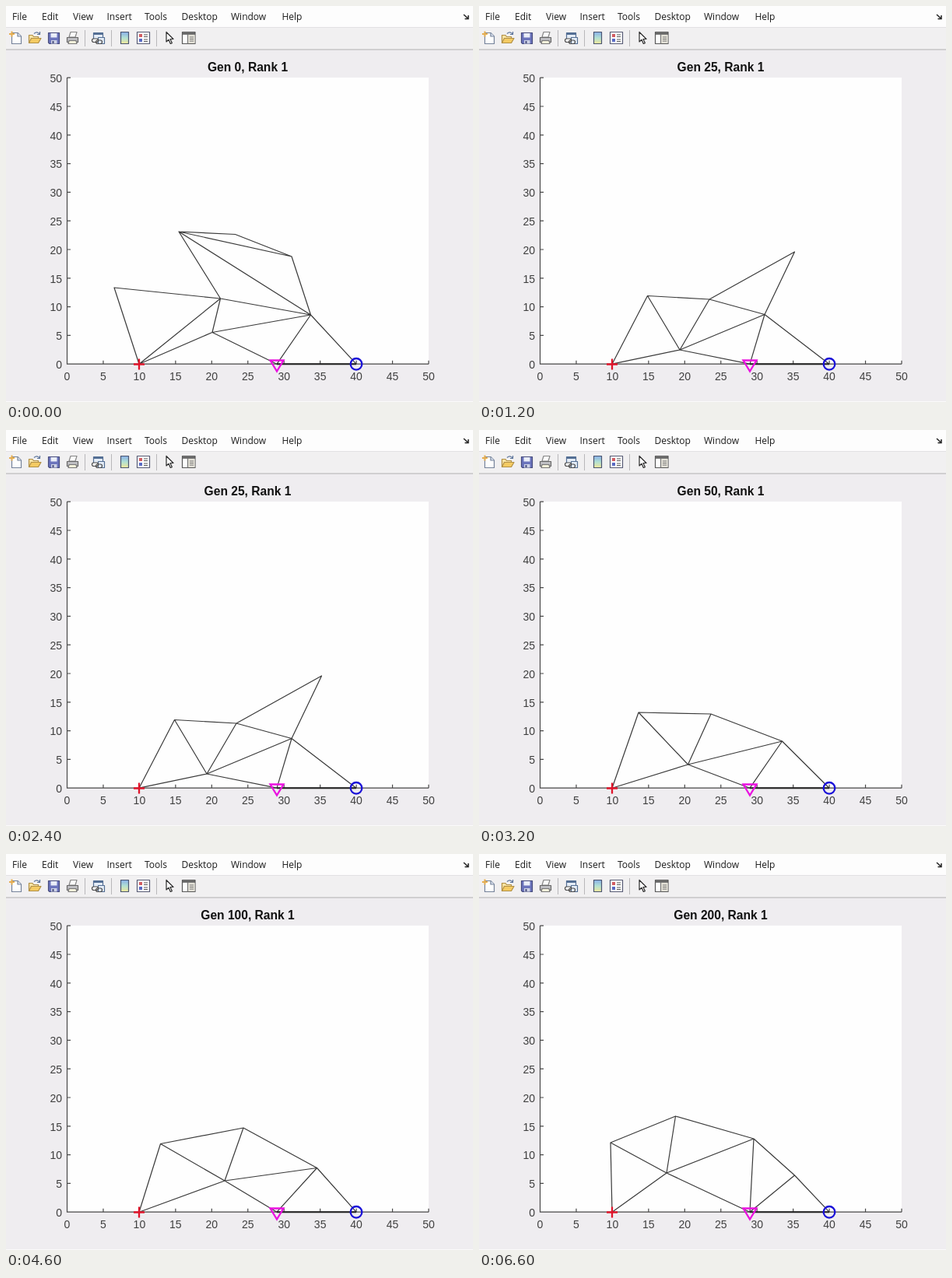
Write an HTML page that moves like this. It is 600 px wide and 509 px high and loops after 8 s.

```html
<!DOCTYPE html>
<html lang="en">
<head>
<meta charset="utf-8">
<title>Truss evolution</title>
<style>
html, body { margin: 0; width: 100%; height: 100%; overflow: hidden; background: #efedf0; }
svg { display: block; width: 600px; height: 509px; }
.menu { font: 12px "Open Sans", "Noto Sans", sans-serif; fill: #1c1c1c; }
.ticks { font: 14px "Liberation Sans", Arial, sans-serif; fill: #404040; }
.title { font: bold 15.6px "Liberation Sans", Arial, sans-serif; fill: #111; text-anchor: middle; }
.axis { stroke: #484848; stroke-width: 1.2; fill: none; }
.truss { stroke: #3a3a3a; stroke-width: 1.2; fill: none; stroke-linejoin: round; }
.mark { fill: none; stroke-width: 2.3; }
</style>
</head>
<body>
<svg viewBox="0 0 600 509">
  <rect width="600" height="509" fill="#efedf0"/>
  <rect width="600" height="27" fill="#fdfdfd"/>
  <rect y="27" width="600" height="29" fill="#f1f0f1"/>
  <path d="M0 27.5H600" stroke="#e2e1e3"/>
  <path d="M0 56H600" stroke="#b0afb1"/>
  <path d="M0 508.5H600" stroke="#fafafa"/>

  <g class="menu" id="menu"></g>
  <path d="M588 11L593 15.500M594 12V16.500H589.500" fill="none" stroke="#222" stroke-width="1.5"/>

  <!-- toolbar -->
  <g stroke-width="1.2" stroke-linejoin="round" opacity=".88">
    <path d="M7.500 34.500H15L19.500 39V48.500H7.500Z" fill="#fff" stroke="#64748f"/>
    <path d="M15 34.500V39H19.500" fill="#dce5f2" stroke="#64748f"/>
    <path d="M4 36H11M7.500 32.500V39.500" stroke="#e5a63a" stroke-width="2"/>
    <path d="M29.500 47.500V37.500H34L35.500 39.500H41.500V42" fill="#fbe39a" stroke="#a9832f"/>
    <path d="M29.500 47.500L32.500 41.500H45L41.500 47.500Z" fill="#f5c650" stroke="#a9832f"/>
    <path d="M36 35.500Q40 32 43 36M43.500 33V36.500H40" fill="none" stroke="#46628f"/>
    <path d="M54.500 34.500H68.500V48.500H56L54.500 47Z" fill="#5963b5" stroke="#30366e"/>
    <path d="M57.500 35H65.500V40.500H57.500Z" fill="#e9edfa"/>
    <path d="M58 44H65.500V48.500H58Z" fill="#c9cee4"/>
    <path d="M59.500 45H61.500V48H59.500Z" fill="#30366e"/>
    <path d="M81 40L83 33.500H91L89 40Z" fill="#fff" stroke="#777"/>
    <path d="M78.500 40.500H92.500V46.500H78.500Z" fill="#b9b9bd" stroke="#555"/>
    <path d="M81 44.500H90L91 48.500H80Z" fill="#f4f0d8" stroke="#666"/>
    <path d="M112.500 34.500H124.500V43.500H112.500Z" fill="#e4edf8" stroke="#3f5e88"/>
    <path d="M112.500 36H124.500" stroke="#3f5e88" stroke-width="2"/>
    <path d="M118.500 40.500H126.500V48.500H118.500Z" fill="#e4edf8" stroke="#3f5e88"/>
    <rect x="110.500" y="42" width="8" height="4.500" rx="2.200" fill="#fff" stroke="#333"/>
    <rect x="115.500" y="44" width="8" height="4.500" rx="2.200" fill="none" stroke="#333"/>
    <rect x="147.500" y="33.500" width="10" height="15" fill="url(#bar)" stroke="#33415f"/>
    <rect x="168.500" y="33.500" width="16" height="15" fill="#fff" stroke="#434864"/>
    <path d="M171 36H175V40H171Z" fill="#d04b50"/>
    <path d="M171 42H175V46H171Z" fill="#4659be"/>
    <path d="M177 37H182M177 39.500H182M177 43H182M177 45.500H182" stroke="#444"/>
    <path d="M206 33.500V46L209 43.300L211.300 48.500L213.300 47.600L211 42.500H215Z" fill="#fff" stroke="#111"/>
    <rect x="226.500" y="33.500" width="16.500" height="15" fill="#fff" stroke="#444"/>
    <path d="M226.500 35.500H243" stroke="#444" stroke-width="2.500"/>
    <path d="M234 37H242.500V48H234Z" fill="#e2dfd4"/>
    <path d="M233.500 36V48.500M236 40H241M236 42.500H241M236 45H241" stroke="#666"/>
  </g>
  <path d="M101.500 31V52M135.500 31V52M193.500 31V52" stroke="#b9b8ba"/>
  <linearGradient id="bar" x2="0" y2="1">
    <stop stop-color="#7ba6e6"/><stop offset=".5" stop-color="#a9dfd0"/><stop offset="1" stop-color="#f1e78f"/>
  </linearGradient>

  <!-- plot -->
  <rect x="78" y="92" width="465" height="368" fill="#fefefe"/>
  <path class="axis" id="axes"/>
  <g class="ticks" id="ticks"></g>
  <text class="title" id="title" x="310.500" y="84"></text>
  <path class="truss" id="truss"/>
  <path d="M348 460.200H450" stroke="#222" stroke-width="1.900"/>
  <path class="mark" d="M164 460.500H178M171 453.500V467.500" stroke="#e0142a"/>
  <path class="mark" d="M339.500 455.500H356.500L348 469.500Z" stroke="#ea10e0"/>
  <circle class="mark" cx="450" cy="460.300" r="7.300" stroke="#1a10d8"/>
</svg>
<script>
const $ = id => document.getElementById(id);

function label(parent, text, x, y, anchor) {
  const el = document.createElementNS("http://www.w3.org/2000/svg", "text");
  el.textContent = text;
  el.setAttribute("x", x);
  el.setAttribute("y", y);
  el.setAttribute("text-anchor", anchor);
  parent.append(el);
}

const menu = { File: 8, Edit: 46, View: 86, Insert: 129.5, Tools: 178, Desktop: 225.5, Window: 289, Help: 354.5 };
for (const name in menu) label($("menu"), name, menu[name], 18, "start");

let axes = "M78.5 92V460.2H543";
for (let v = 0; v <= 50; v += 5) {
  const x = 78.5 + v * 9.29, y = 460.2 - v * 7.36;
  axes += `M${x} 460.2v-4.5M78.5 ${y}h4.5`;
  label($("ticks"), v, x, 481, "middle");
  label($("ticks"), v, 72, y + 5.8, "end");
}
$("axes").setAttribute("d", axes);

// Joints shared by every truss: B and G are supports, E carries the load.
const base = { B: [171, 460.2], E: [348, 460.2], G: [450, 460.2] };

// Turns strokes such as "BAC DE" into path data.
function truss(strokes, joints) {
  const at = { ...base, ...joints };
  return strokes.split(" ").map(s => "M" + [...s].map(k => at[k]).join("L")).join("");
}

const plain = "BACDB AD CFDEFG";
const first = truss("BACBDCHIJHFJ CFDEFG", {
  A: [139, 362], C: [275.5, 376], D: [265, 419.5], F: [391.5, 397],
  H: [222, 290], I: [294.5, 293.5], J: [367, 322]
});
const second = truss("BACDB AD CJFC FDEFG", {
  A: [216.5, 372.5], C: [296, 377], D: [258, 442], F: [367, 396.5], J: [405.5, 316]
});
const third = truss(plain, { A: [205, 363], C: [298, 365], D: [268.5, 430], F: [389.5, 400] });
const fourth = truss(plain, { A: [198.5, 372.5], C: [305, 352], D: [281, 420], F: [399.5, 403.5] });
const last = truss("BACDB AD CFDEFKEKG", {
  A: [169, 371], C: [252.5, 337], D: [241, 410], F: [353, 366], K: [405.5, 413]
});

// start time, generation, shape
const steps = [
  [0, 0, first], [1200, 25, second], [2600, 50, third], [3800, 75, fourth],
  [4200, 100, fourth], [4800, 125, fourth], [5200, 150, fourth], [5600, 175, fourth], [6400, 200, last]
];

const start = performance.now();
let shown;
function draw(now) {
  const t = Math.max(0, now - start) % 8000;
  const step = steps.findLast(s => s[0] <= t);
  if (step !== shown) {
    shown = step;
    $("title").textContent = `Gen ${step[1]}, Rank 1`;
    $("truss").setAttribute("d", step[2]);
  }
  requestAnimationFrame(draw);
}
draw(start);
</script>
</body>
</html>
```
